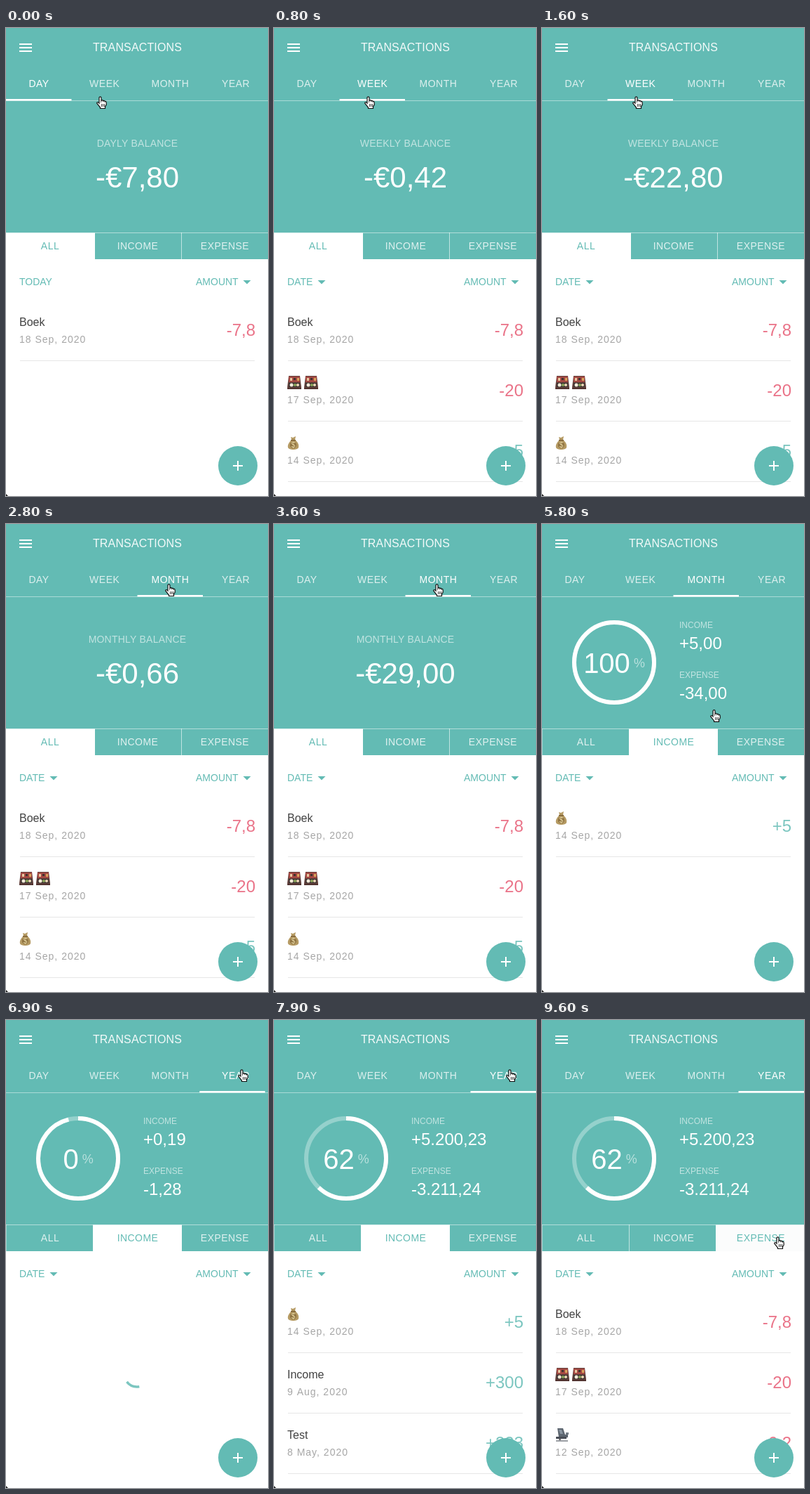
Recreate the animation shown at these times as an HTML page with a canvas. Size 374 by 666 pixels, loop 9.7 s.

```html
<!DOCTYPE html>
<html lang="en">
<head>
<meta charset="utf-8">
<title>Transactions</title>
<style>
  html, body { margin: 0; width: 100%; height: 100%; overflow: hidden; background: #fff; }
  canvas { display: block; }
</style>
</head>
<body>
<canvas width="374" height="666"></canvas>
<script>
const ctx = document.querySelector('canvas').getContext('2d');
const LOOP = 9700, LOAD = 300, COUNT = 450;
const TEAL = '#63bbb4', PINK = '#ea7489', MINT = '#7cc6c0', WHITE = '#fff';
const white = a => `rgba(255,255,255,${a})`;

// Click times
const WEEK = 500, MONTH = 2500, INCOME = 4492, YEAR = 6688, EXPENSE = 8900;

const book = ['Boek', '18 Sep, 2020', '-7,8'];
const lunch = [[drawBento, drawBento], '17 Sep, 2020', '-20'];
const salary = [[drawBag], '14 Sep, 2020', '+5'];
const seat = [[drawSeat], '12 Sep, 2020', '-6,2'];
const yearIncome = [salary, ['Income', '9 Aug, 2020', '+300'], ['Test', '8 May, 2020', '+223']];

const clamp = x => Math.max(0, Math.min(1, x));
const expoOut = x => x >= 1 ? 1 : 1 - 2 ** (-10 * x);
const cubicInOut = x => x < .5 ? 4 * x ** 3 : 1 - 4 * (1 - x) ** 3;

// Value that starts easing to each target at its time, even mid-flight
function track(t, start, steps, duration, ease) {
  let value = start;
  steps.forEach(([at, target], i) => {
    if (t < at) return;
    const until = Math.min(t, steps[i + 1]?.[0] ?? t);
    value += (target - value) * ease(clamp((until - at) / duration));
  });
  return value;
}

const count = (t, start, steps) => track(t, start, steps, COUNT, expoOut);

function money(value) {
  const [whole, cents] = Math.abs(value).toFixed(2).split('.');
  return whole.replace(/\B(?=(\d{3})+$)/g, '.') + ',' + cents;
}

function text(str, x, y, size, color, align = 'left', spacing = 0) {
  ctx.font = `${size}px "Liberation Sans", Arial, sans-serif`;
  ctx.letterSpacing = spacing + 'px';
  ctx.textAlign = align;
  ctx.fillStyle = color;
  ctx.fillText(str, x, y);
}

function rect(x, y, w, h, color) {
  ctx.fillStyle = color;
  ctx.fillRect(x, y, w, h);
}

function disc(x, y, r, color) {
  ctx.fillStyle = color;
  ctx.beginPath();
  ctx.arc(x, y, r, 0, 2 * Math.PI);
  ctx.fill();
}

function arc(x, y, r, from, to, width, color) {
  ctx.lineWidth = width;
  ctx.strokeStyle = color;
  ctx.beginPath();
  ctx.arc(x, y, r, from, to);
  ctx.stroke();
}

function shape(path, color) {
  ctx.fillStyle = color;
  ctx.fill(new Path2D(path));
}

function drawBento() {
  shape('M2 0H18L20 16V19H0V16Z', '#64423d');
  rect(2, 1, 16, 8, '#a34842');
  rect(2, 10, 16, 6, '#3e3432');
  rect(4, 3, 3, 4, '#e9c9a0');
  rect(9, 3, 3, 3, '#40332f');
  rect(14, 3, 3, 4, '#d9a55c');
  disc(6, 13, 2.5, '#f3ead9');
  disc(11, 13, 2, '#8ba75a');
  disc(15, 13, 2, '#efd7b8');
  rect(0, 17, 20, 2, '#513330');
}

function drawBag() {
  shape('M5 1L8 2L12 0L11 5C15 8 17 12 16 16C15 20 2 20 1 16C0 12 3 8 6 5Z', '#b59a63');
  rect(5, 5, 7, 1.5, '#7d6134');
  disc(8.5, 12.5, 4.5, '#8d713f');
  text('$', 8.5, 16, 10, '#f2e3ae', 'center');
}

function drawSeat() {
  shape('M3 0H11L14 9H18V13H5Z', '#5d6670');
  shape('M5 2H9L11 8H7Z', '#8995a1');
  rect(1, 12, 15, 3, '#494e57');
  rect(5, 15, 3, 3, '#777');
  rect(1, 17, 17, 2, '#9ca0a5');
  rect(15, 6, 4, 3, '#747d87');
}

function drawHeader(tab, t) {
  rect(0, 0, 374, 329, TEAL);
  for (const y of [22, 27, 32]) rect(19, y, 18, 2, WHITE);
  text('TRANSACTIONS', 187.5, 33, 16, white(.93), 'center', .15);
  ['DAY', 'WEEK', 'MONTH', 'YEAR'].forEach((name, i) =>
    text(name, 47 + 93.7 * i, 84, 14, white(i === tab ? 1 : .78), 'center', .5));
  rect(0, 103, 374, 1, white(.45));
  const x = track(t, 0, [[WEEK, 93.5], [MONTH, 187.5], [YEAR, 280.5]], 300, x => 1 - (1 - x) ** 2.5);
  rect(x, 101, 93.5, 2.5, WHITE);
}

function drawBalance(tab, t) {
  const total = count(t, 7.8, [[WEEK, 0], [WEEK + LOAD, 22.8], [MONTH, 0], [MONTH + LOAD, 29]]);
  text(['DAYLY', 'WEEKLY', 'MONTHLY'][tab] + ' BALANCE', 187.5, 169, 14, white(.6), 'center', .2);
  text('-€' + money(total), 187.5, 227, 42, WHITE, 'center');
}

function drawSummary(t) {
  const loaded = YEAR + LOAD;
  const share = track(t, 0, [[INCOME, 1], [YEAR, 0], [loaded, .62]], 1000, cubicInOut);
  const percent = t < YEAR ? '100' : t < loaded ? '0' : '62';
  const top = -Math.PI / 2;
  arc(103, 197, 57, 0, 2 * Math.PI, 6, white(.32));
  arc(103, 197, 57, top, top + 2 * Math.PI * share, 6, WHITE);

  const width = percent.length * 22.25;
  const left = 103 - (width + 21) / 2;
  text(percent, left, 211.5, 40, WHITE);
  text('%', left + width + 5, 204, 18, white(.55));

  const earned = count(t, 0, [[INCOME, 5], [YEAR, 0], [loaded, 5200.23]]);
  const spent = count(t, 0, [[INCOME, 34], [YEAR, 0], [loaded, 3211.24]]);
  text('INCOME', 196, 148, 12, white(.6));
  text('+' + money(earned), 196, 178, 24, WHITE);
  text('EXPENSE', 196, 219, 12, white(.6));
  text('-' + money(spent), 196, 249, 24, WHITE);
}

function drawFilters(active, hovered) {
  rect(0, 291, 374, 1, white(.5));
  rect(0, 291, 1, 38, white(.4));
  if (active !== 1) rect(active ? 124 : 250, 291, 1, 38, white(.6));
  rect(124 * active, 291.5, 127, 37.5, hovered ? '#fbfcfc' : WHITE);
  ['ALL', 'INCOME', 'EXPENSE'].forEach((name, i) =>
    text(name, [63, 188, 312.5][i], 315, 14, i === active ? TEAL : white(.8), 'center', .45));
}

function drawSort(label, x, arrowX) {
  text(label, x, 366, 14, TEAL);
  if (arrowX) shape(`M${arrowX} 359h11l-5.5 5.5z`, TEAL);
}

function drawRow([title, date, amount], i) {
  const y = 86 * i;
  if (typeof title === 'string') text(title, 19, 424 + y, 16, '#424242');
  else title.forEach((icon, n) => {
    ctx.save();
    ctx.translate(19 + 24 * n, 409 + y);
    icon();
    ctx.restore();
  });
  text(date, 19, 448 + y, 14, '#a6a6a6', 'left', 1);
  text(amount, 356, 438 + y, 24, amount[0] === '+' ? MINT : PINK, 'right');
  rect(20, 473 + y, 335, 1, '#e6e6e6');
}

function drawSpinner(elapsed) {
  const start = (25 + 360 * elapsed / 1400) * Math.PI / 180;
  arc(187, 503.5, 18.5, start, start + elapsed / 206 * Math.PI / 3, 3.5, MINT);
}

function drawCursor(x, y) {
  ctx.save();
  ctx.translate(x, y);
  const hand = new Path2D('M4 10V2.5C4 .2 7 .2 7 2.5V6.5C7.5 5 9.6 5.3 9.8 7C10.6 5.8 12 6.3 12.2 7.8' +
    'C13 6.9 14.2 7.4 14.2 9V12L12.5 15V17.5H5.5V16L1 10.5C0 8.8 2.2 7.8 4 10Z');
  ctx.fillStyle = WHITE;
  ctx.fill(hand);
  ctx.lineWidth = 1.2;
  ctx.strokeStyle = '#111';
  ctx.stroke(hand);
  for (const n of [7, 9, 11]) rect(n, 11, .8, 4, '#111');
  ctx.restore();
}

function render(t) {
  const tab = [WEEK, MONTH, YEAR].filter(at => t >= at).length;
  const filter = [INCOME, EXPENSE].filter(at => t >= at).length;
  const click = [YEAR, MONTH, WEEK].find(at => t >= at);
  const loading = click && t < click + LOAD;
  const rows = filter === 2 ? [book, lunch, seat]
    : filter === 1 ? (tab === 3 ? yearIncome : [salary])
    : tab ? [book, lunch, salary] : [book];
  const move = (start, steps) => track(t, start, steps, 550, cubicInOut);
  const x = move(129, [[1950, 227], [3800, 218], [5600, 331]]);
  const y = move(97, [[1950, 85], [3800, 311], [5600, 70], [8250, 308]]);

  rect(0, 0, 374, 666, WHITE);
  drawHeader(tab, t);
  if (filter) drawSummary(t);
  else drawBalance(tab, t);
  drawFilters(filter, filter && y > 285);
  drawSort(tab ? 'DATE' : 'TODAY', 19, tab && 62.5);
  drawSort('AMOUNT', 271, 338.5);
  if (loading) drawSpinner(t - click);
  else rows.forEach(drawRow);

  disc(331, 623, 28, TEAL);
  rect(324, 622, 14, 2, WHITE);
  rect(330, 616, 2, 14, WHITE);
  shape('M0 663L3 666H0Z', '#222');
  drawCursor(x, y);
}

function frame() {
  render(performance.now() % LOOP);
  requestAnimationFrame(frame);
}
frame();
</script>
</body>
</html>
```
